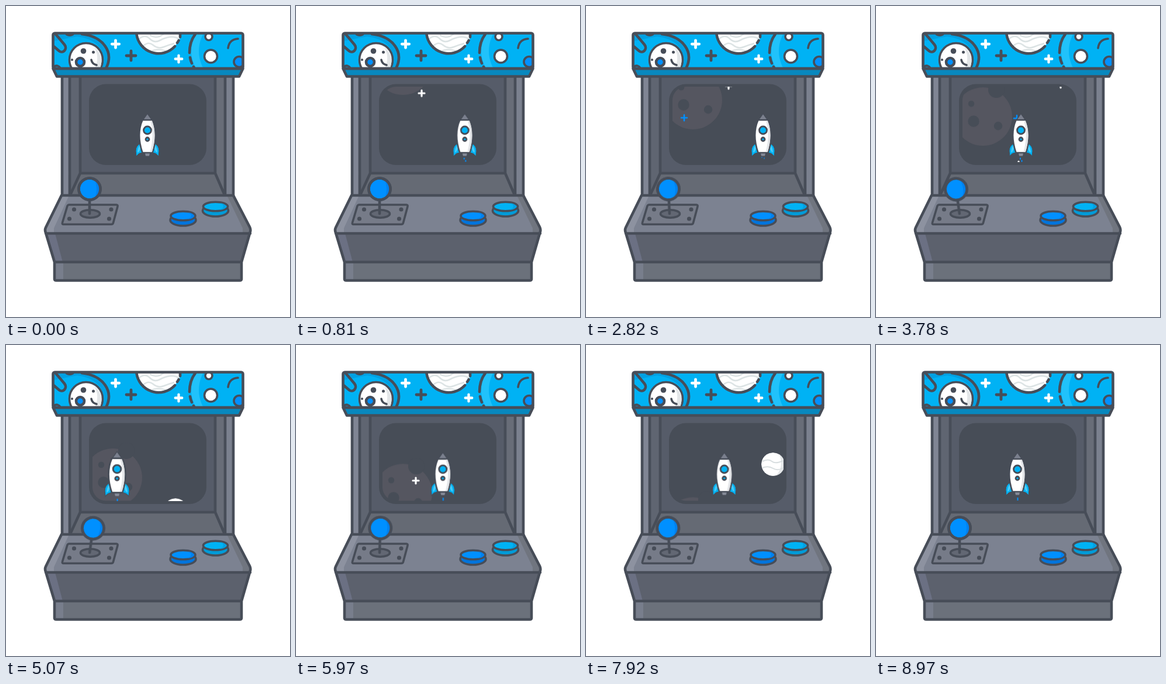
An HTML page without scripts for the animation above (9 s loop, 486x532 px).

```html
<!DOCTYPE html>
<html lang="en">
<head>
<meta charset="utf-8">
<title>Arcade rocket</title>
<style>
html, body { margin: 0; width: 100%; height: 100%; overflow: hidden; background: #fff; }
svg { display: block; width: 486px; height: 532px; }
.ink { stroke: #474d58; stroke-width: 4.6; stroke-linejoin: round; stroke-linecap: round; }
.thin { stroke-width: 3.6; }
.line { fill: none; }
.dark { fill: #474d58; }
.sky { fill: #00b2f4; }
.royal { fill: #0090ff; }
.white { fill: #fff; }

#moon { animation: drift 9s linear infinite; }
@keyframes drift { from { transform: translate(183px, 78.4px); } to { transform: translate(183px, 342px); } }

.fall { animation: fall 9s linear var(--at) infinite; }
@keyframes fall { 0% { transform: none; } 14.444%, 100% { transform: translateY(182px); } }

#rocket { animation: steer 9s infinite; }
@keyframes steer {
  0% { transform: translate(242px, 220px); animation-timing-function: ease-in-out; }
  13.889% { transform: translate(305px, 220px); animation-timing-function: ease-in; }
  19% { transform: translate(284px, 220px); animation-timing-function: ease-out; }
  23.889% { transform: translate(270px, 220px); animation-timing-function: ease-in-out; }
  31.333% { transform: translate(303px, 220px); animation-timing-function: cubic-bezier(.4, 0, .85, .8); }
  42% { transform: translate(248px, 220px); animation-timing-function: cubic-bezier(.15, .2, .6, 1); }
  56.333% { transform: translate(190px, 220px) scale(1.05); animation-timing-function: ease-in-out; }
  70% { transform: translate(262px, 220px); animation-timing-function: ease-in; }
  77.333% { transform: translate(251px, 220px); animation-timing-function: ease-out; }
  84.444% { transform: translate(236px, 220px); animation-timing-function: ease-in-out; }
  100% { transform: translate(242px, 220px); }
}

#stick { transform-origin: 143px 356px; animation: tilt 9s ease-in-out infinite; }
@keyframes tilt {
  0%, 10.5% { transform: none; }
  16%, 20% { transform: rotate(-8deg); }
  26% { transform: none; }
  31.333% { transform: rotate(-2.7deg); }
  36%, 43% { transform: rotate(-8deg); }
  51.5% { transform: rotate(-1deg); }
  56%, 60% { transform: rotate(8deg); }
  71% { transform: rotate(-2deg); }
  75%, 83.5% { transform: rotate(-8deg); }
  92%, 100% { transform: none; }
}

#cap { animation: press 9s ease-in-out infinite; }
@keyframes press {
  0%, 23.5%, 29%, 45%, 50.5%, 59%, 64%, 100% { transform: none; }
  26%, 47.5%, 61% { transform: translateY(4px); }
}

.puff { opacity: 0; animation: 1.5s step-end infinite; }
.pair { animation-name: pair; }
.jet { animation-name: jet; }
.dots { animation-name: dots; }
.ash { animation-name: ash; }
@keyframes pair { 0% { opacity: 0; } 8% { opacity: 1; } 22% { opacity: 0; } }
@keyframes jet { 0% { opacity: 0; } 30% { opacity: 1; } 44%, 100% { opacity: 0; } 96% { opacity: 1; } }
@keyframes dots { 0% { opacity: 0; } 46% { opacity: 1; } 58% { opacity: 0; } }
@keyframes ash { 0% { opacity: 0; } 82% { opacity: .45; } 94% { opacity: 0; } }
</style>
</head>
<body>
<svg viewBox="0 0 486 532">
  <defs>
    <clipPath id="sign"><rect x="82" y="48" width="322" height="58" rx="2"/></clipPath>
    <clipPath id="view"><rect x="148" y="138" width="190" height="128.5" rx="23"/></clipPath>
    <clipPath id="ball"><circle cx="143" cy="313" r="18"/></clipPath>
    <clipPath id="globe"><circle r="20"/></clipPath>
    <path id="plus" d="M-5 0H5M0-5V5" fill="none" stroke-linecap="round"/>
    <g id="planet" clip-path="url(#globe)">
      <circle r="20" fill="#fff"/>
      <path d="M10-18Q20 2 5 20H20V-18Z" fill="#e5e8ea"/>
      <g fill="none" stroke="#d8dee0" stroke-width="2"><path d="M-18-5Q-8-10-2-5T17-6M-18 6Q-8 2 0 7T18 6"/></g>
    </g>
  </defs>

  <!-- cabinet -->
  <path fill="#565c69" d="M96 120H389V324H96Z"/>
  <path fill="#808594" d="M96 120H109V324H96Z"/>
  <path fill="#5f6571" d="M109 120H127V286L110 323Z"/>
  <path fill="#686d78" d="M358 120H375V323L358 286Z"/>
  <path fill="#7b818f" d="M375 120H389V324H375Z"/>
  <path fill="#656a74" d="M127 286H358L375 324H109Z"/>
  <path class="ink line" d="M96 120V324M109 120V324M127 120V286L110 323M389 120V324M375 120V324M358 120V286L374 323M127 286H358"/>
  <rect x="142" y="133.5" width="201" height="138.5" rx="29" fill="#474d57"/>

  <!-- game -->
  <g clip-path="url(#view)">
    <g id="moon">
      <circle r="50" fill="#555660"/>
      <g fill="#474d57">
        <circle cx="-16" cy="8" r="9.7"/><circle cx="26" cy="16" r="7.2"/>
        <circle cx="-20" cy="-22" r="5.2"/><circle cx="23" cy="-46" r="14"/>
      </g>
    </g>
    <g stroke="#fff" stroke-width="3.2">
      <g class="fall" style="--at:.531s"><use href="#plus" x="215" y="110"/></g>
      <g class="fall" style="--at:2.631s"><use href="#plus" x="244" y="110"/></g>
      <g class="fall" style="--at:3.605s"><use href="#plus" x="316" y="110"/></g>
      <g class="fall" style="--at:5.1s"><use href="#plus" x="205" y="110"/></g>
    </g>
    <g stroke="#0090ff" stroke-width="2.6">
      <g class="fall" style="--at:2.241s"><use href="#plus" x="168" y="110"/></g>
      <g class="fall" style="--at:3.194s"><use href="#plus" x="241" y="110"/></g>
      <g class="fall" style="--at:6.067s"><use href="#plus" x="311" y="110"/></g>
    </g>
    <g class="fall" style="--at:3.841s"><use href="#planet" x="290" y="110"/></g>
    <g class="fall" style="--at:7.25s"><use href="#planet" x="320" y="110"/></g>

    <g id="rocket">
      <g fill="none" stroke="#0090ff" stroke-width="2">
        <path class="puff pair" d="M-2.5 39V42M2.5 39V43"/>
        <path class="puff jet" d="M.5 41V46"/>
        <path class="puff dots" d="M-1 39.5V42.5M1.5 43.5V46.5"/>
        <path class="puff ash" d="M-2 38V40M2 39V42"/>
      </g>
      <g class="sky" stroke="#474d58" stroke-width="1">
        <path d="M-12 15Q-20 19-20 28L-19 37Q-15 31-9 31Z"/>
        <path d="M12 15Q20 19 20 28L19 37Q15 31 9 31Z"/>
      </g>
      <path fill="#48cdfb" d="M-13 18Q-17 23-17 31L-14 29L-11 22ZM13 18Q17 23 17 31L14 29L11 22Z"/>
      <path fill="#858a97" d="M-4 32H4L3 36.5H-3Z"/>
      <path fill="#7b808e" stroke="#474d58" stroke-width="1.4" stroke-linejoin="round" d="M0-36L-8.5-24H8.5Z"/>
      <path fill="#fff" stroke="#474d58" stroke-width="2.6" stroke-linejoin="round" d="M-8.5-25H8.5C16-8 15 12 8.5 31H-8.5C-15 12-16-8-8.5-25Z"/>
      <path fill="#e3e5e8" d="M5-23.5H8C14-8 13.500 12 8 29.500H4.500C10 10 10-8 5-23.500Z"/>
      <g class="sky" stroke="#474d58" stroke-width="2.8">
        <circle cy="-7.500" r="6.500"/><circle cy="8" r="3"/>
      </g>
    </g>
  </g>

  <!-- marquee -->
  <rect class="sky" x="80" y="46" width="326" height="61" rx="4"/>
  <g clip-path="url(#sign)">
    <path fill="#00a0e2" d="M82 48H143A41 41 0 0 1 170 107H82Z"/>
    <path class="sky" d="M82 60L122 52Q166 58 168 95L160 107H82Z"/>
    <path class="ink line" d="M78 40L100 66C106 74 97 82 91 77L78 66M130 48C165 52 187 78 170 109"/>
    <path class="ink thin line" d="M82 104Q88 99 94 107"/>
    <ellipse class="dark" cx="109" cy="47" rx="8" ry="5"/>
    <circle class="ink thin white" cx="137" cy="92" r="28.500"/>
    <path fill="#e3e6e8" d="M150 69Q169 84 161 107H151Q162 88 150 69Z"/>
    <g class="dark"><circle cx="132.500" cy="77" r="4.800"/><circle cx="149.500" cy="79" r="2.500"/><circle cx="113" cy="92" r="2"/></g>
    <circle class="ink royal" cx="127" cy="96" r="7"/>
    <path class="ink thin line" d="M146 92Q147 99 155 101"/>

    <g stroke-linecap="butt">
      <use href="#plus" transform="translate(187.500 65) scale(1.25)" stroke="#fff" stroke-width="3.800"/>
      <use href="#plus" transform="translate(214 85) scale(1.6)" stroke="#474d58" stroke-width="3"/>
      <use href="#plus" transform="translate(295.500 90.500) scale(1.150)" stroke="#fff" stroke-width="3.800"/>
    </g>

    <circle class="white" cx="261" cy="43" r="38"/>
    <g fill="none" stroke="#dce3e4" stroke-width="2.600">
      <path d="M228 56Q238 48 246 56T263 59T281 53T297 57M235 68Q244 60 252 67T270 70T288 64M246 50Q258 57 268 49T288 48M250 77Q261 72 273 77"/>
    </g>
    <path class="ink line" d="M223.400 48A38 38 0 0 0 289 69M293 63A38 38 0 0 0 295.500 59M298 53V46"/>

    <circle fill="#21c2fa" cx="376" cy="77" r="59"/>
    <circle class="sky" cx="390" cy="77" r="60"/>
    <path class="ink line" d="M324 48Q314 61 314 80M315 88Q316 94 318 98M321 104L324 109"/>
    <circle class="ink thin white" cx="347" cy="52.500" r="6"/>
    <circle class="ink thin white" cx="350.500" cy="86" r="11"/>
    <path class="ink thin line" d="M380 72Q382 57 397 56"/>
    <circle class="ink thin royal" cx="399" cy="95.500" r="9"/>
  </g>
  <path class="ink" fill="#0888be" d="M80.500 107H405.500L399 120.500H87Z"/>
  <rect class="ink line" x="80.500" y="46.500" width="325" height="60.500" rx="3"/>

  <!-- control deck -->
  <path fill="#7c8291" d="M95 324H389L418 380V389H68V380Z"/>
  <path fill="#8d92a0" d="M95 324H108L82 380V389H68V380Z"/>
  <path fill="#70757f" d="M378 324H389L418 380V389H405V380Z"/>
  <path fill="#5c616d" d="M68 389H418L403 438H83Z"/>
  <path fill="#6b7083" d="M68 389H84L97 438H83Z"/>
  <path fill="#6b717b" d="M82.500 438H403.500V470H82.500Z"/>
  <path fill="#787e8c" d="M82.500 438H98V470H82.500Z"/>
  <path class="ink line" d="M95 324H389L417 378Q419 382 418 386L403 438V467Q403 469.500 400 469.500H86Q83 469.500 83 467V438L68 388Q66 383 68 379ZM68 389H418M83 438H403"/>

  <path class="ink thin" fill="#767b88" d="M108 340H189Q191.500 340 191 343L183.500 371Q183 373.500 180 373.500H98.500Q95.500 373.500 96.500 370.500L105 342Q106 340 108 340Z"/>
  <g class="dark"><circle cx="116.500" cy="348" r="3.600"/><circle cx="180" cy="348" r="3.600"/><circle cx="108.500" cy="364" r="3.600"/><circle cx="176.500" cy="364" r="3.600"/></g>
  <ellipse class="ink thin" fill="#626773" cx="144" cy="355.500" rx="16.500" ry="6.700"/>
  <g id="stick">
    <path class="ink line" d="M143 333V355"/>
    <circle class="ink royal" cx="143" cy="313" r="18.500"/>
    <path clip-path="url(#ball)" fill="#0080ee" d="M149 293Q161 313 149 333H166V293Z"/>
    <circle class="ink line" cx="143" cy="313" r="18.500"/>
  </g>

  <ellipse class="ink thin" fill="#0074dc" cx="303" cy="366" rx="22" ry="10"/>
  <ellipse class="ink thin royal" cx="303" cy="359" rx="21" ry="7.800"/>
  <path fill="#0080ee" d="M311 353Q323 358 311 365Q321 364 322 359Q320 354 311 353Z"/>
  <ellipse class="ink thin" fill="#009bd8" cx="358.500" cy="350" rx="22" ry="10"/>
  <g id="cap">
    <ellipse class="ink thin sky" cx="358.500" cy="343" rx="21" ry="7.800"/>
    <path fill="#00a0e2" d="M366 337Q378 342 366 349Q376 348 377 343Q375 338 366 337Z"/>
  </g>
</svg>
</body>
</html>
```
